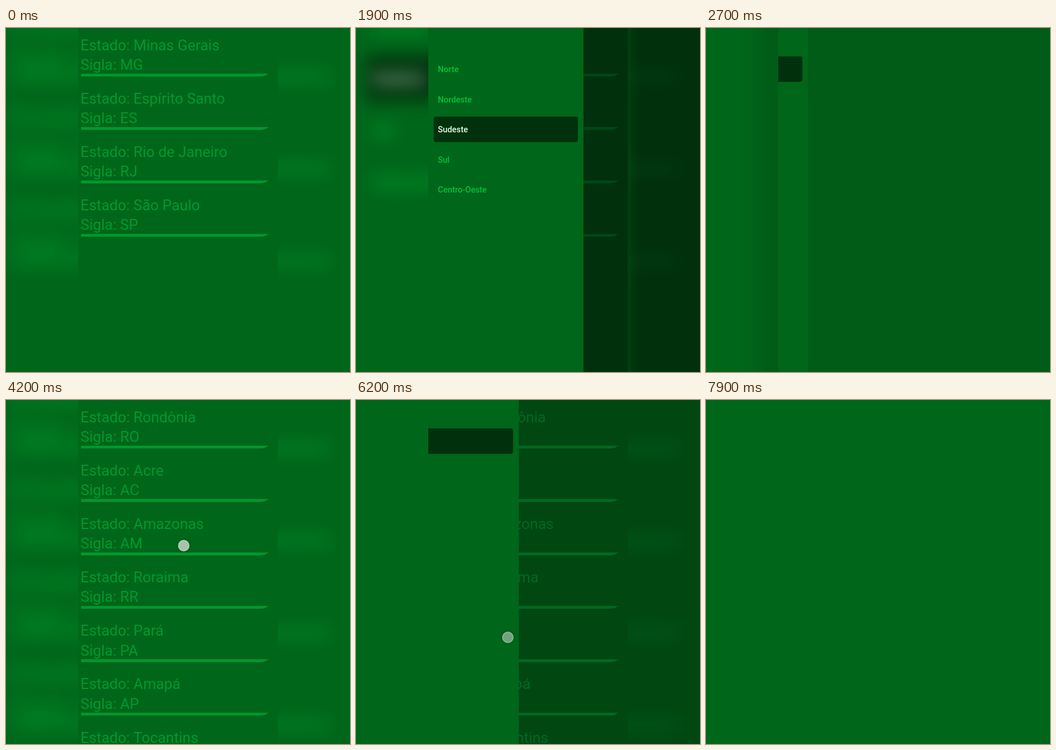
An HTML page with a canvas that plays this animation: 600 px wide and 600 px high, repeating every 8000 ms.

```html
<!DOCTYPE html>
<html lang="pt">
<head>
<meta charset="utf-8">
<title>Estados</title>
<style>
  html, body { margin: 0; width: 100%; height: 100%; overflow: hidden; background: #00661a; }
  canvas { display: block; width: 600px; height: 600px; }
</style>
</head>
<body>
<canvas id="stage" width="600" height="600"></canvas>
<script>
const LOOP = 8000, STEP = 100, SIZE = 600;
const LEFT = 126, WIDTH = 348, DRAWER = 270.8, ROW = 93.15, ITEM = 52.5, MAX_SCROLL = 52;
const BASE = '#00661a', DARK = '#00310c', LINE = '#00992e', LINK = '#00c43b';

const REGIONS = ['Norte', 'Nordeste', 'Sudeste', 'Sul', 'Centro-Oeste'];
const SOUTHEAST = ['Minas Gerais MG', 'Espírito Santo ES', 'Rio de Janeiro RJ', 'São Paulo SP'];
const NORTH = ['Rondônia RO', 'Acre AC', 'Amazonas AM', 'Roraima RR', 'Pará PA', 'Amapá AP', 'Tocantins TO'];

const within = (t, a, b) => t >= a && t < b;

// Smoothstep from 0 to 1, beginning at start.
function ease(t, start, duration) {
  const u = Math.min(1, Math.max(0, (t - start) / duration));
  return u * u * (3 - 2 * u);
}

// One drawer visit: drag open, tap an item, slide shut.
const VISITS = [
  { drag: 1300, tap: 2200, close: 2500, from: 2, to: 0 },
  { drag: 5900, tap: 7300, close: 7600, from: 0, to: 1 }
];

const ctx = document.getElementById('stage').getContext('2d');
const layer = document.createElement('canvas');
layer.width = layer.height = SIZE;
const g = layer.getContext('2d');

function rect(color, x, y, w, h) {
  g.fillStyle = color;
  g.fillRect(x, y, w, h);
}

function text(str, x, y, font, color) {
  g.font = font + ' Roboto, sans-serif';
  g.fillStyle = color;
  g.fillText(str, x, y);
}

function tile(i, color) {
  g.fillStyle = color;
  g.beginPath();
  g.roundRect(135.6, 49.4 + i * ITEM, 251.4, 44.7, 4);
  g.fill();
}

function list(rows, scroll) {
  rows.forEach((row, i) => {
    const y = i * ROW - scroll;
    text('Estado: ' + row.slice(0, -3), 130, y + 38.6, '25.8px', LINE);
    text('Sigla: ' + row.slice(-2), 130, y + 72.9, '25.8px', LINE);
    g.beginPath();
    g.moveTo(131, y + 79.7);
    g.lineTo(458, y + 79.7);
    g.quadraticCurveTo(451, y + 84.6, 443, y + 84.6);
    g.lineTo(131, y + 84.6);
    g.fill();
  });
}

function drawer(open, selected, pressed, press) {
  rect(`rgba(0,0,0,${.53 * open})`, 0, 0, SIZE, SIZE);
  g.save();
  g.translate((open - 1) * DRAWER, 0);
  rect(BASE, -SIZE, 0, SIZE + LEFT + DRAWER, SIZE);
  tile(selected, DARK);
  REGIONS.forEach((name, i) =>
    text(name, 142.8, 77.4 + i * ITEM, '500 14.4px', i === selected ? '#e0ffe8' : LINK));
  tile(pressed, `rgba(0,0,0,${press})`);
  g.restore();
}

function dot(x, y, alpha) {
  g.save();
  g.shadowColor = 'rgba(0,40,10,.6)';
  g.shadowBlur = 4;
  g.fillStyle = `rgba(255,255,255,${alpha})`;
  g.beginPath();
  g.arc(x, y, 10, 0, 7);
  g.fill();
  g.restore();
  g.strokeStyle = 'rgba(255,255,255,.2)';
  g.lineWidth = 1.5;
  g.beginPath();
  g.arc(x, y, 9, 0, 7);
  g.stroke();
}

function visit(t, { drag, tap, close, from, to }) {
  const open = ease(t, drag, 540) - ease(t, close, 278);
  const chosen = t >= close + STEP;
  const press = chosen ? 0 : .19 * ease(t, tap, 300);
  if (open > 0) drawer(open, chosen ? to : from, to, press);
  if (within(t, drag, drag + 500)) dot(LEFT + Math.max(6, open * DRAWER - 19), 414, .45);
  if (within(t, tap, tap + STEP)) dot(240, 72 + to * ITEM, .5);
}

function scene(t) {
  const scroll = MAX_SCROLL * (ease(t, 4200, 500) - ease(t, 4900, 500));
  rect(BASE, 0, 0, SIZE, SIZE);
  if (t < 2500) list(SOUTHEAST, 0);
  else if (within(t, 3300, 7700)) list(NORTH, scroll);
  if (within(t, 4300, 5700)) rect('rgba(0,48,12,.6)', 471, scroll * 48 / MAX_SCROLL, 3, 552);
  VISITS.forEach(v => visit(t, v));
  if (within(t, 4200, 4700) || within(t, 4900, 5500)) dot(310, 254 - scroll, .65);
}

// The screen sits over a zoomed, blurred copy of itself.
function draw(t) {
  scene(t);
  const big = SIZE * SIZE / WIDTH, pos = (SIZE - big) / 2;
  ctx.filter = 'blur(15px)';
  ctx.drawImage(layer, pos, pos, big, big);
  ctx.filter = 'none';
  ctx.drawImage(layer, LEFT, 0, WIDTH, SIZE, LEFT, 0, WIDTH, SIZE);
}

let last = -1;
const start = performance.now();
function tick() {
  const t = Math.floor((performance.now() - start) % LOOP / STEP) * STEP;
  if (t !== last) draw(last = t);
  requestAnimationFrame(tick);
}
tick();
</script>
</body>
</html>
```
